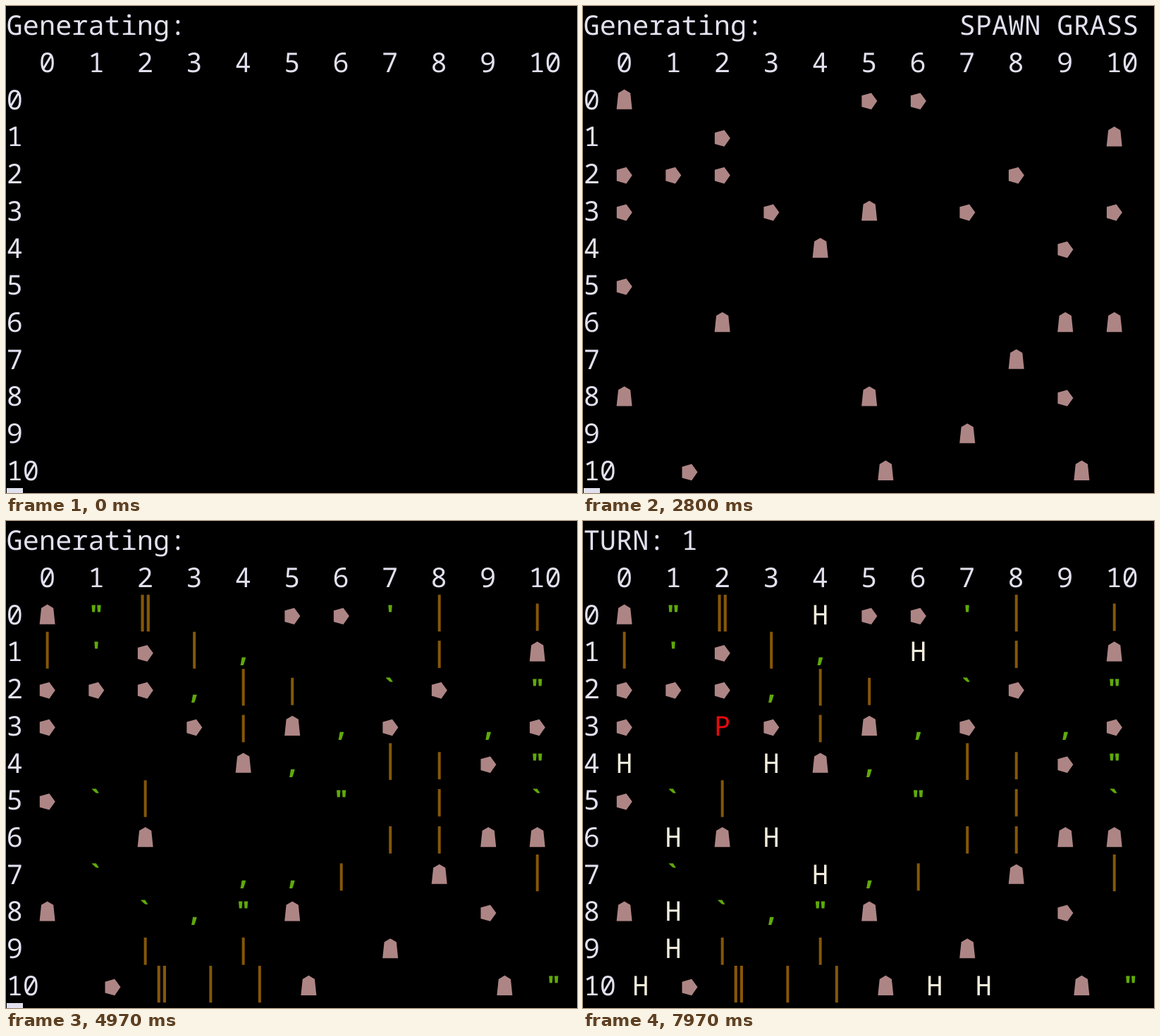
An HTML page that plays this animation: 810 by 692 pixels, repeating every 8 s.

```html
<!DOCTYPE html>
<html lang="en">
<head>
<meta charset="utf-8">
<title>Map generator</title>
<style>
  html, body { margin: 0; width: 100%; height: 100%; overflow: hidden; background: #000; }
  svg { display: block; width: 810px; height: 692px; }
  text {
    font: 38.6px "Noto Sans Mono", monospace;
    text-rendering: geometricPrecision;
    white-space: pre;
    fill: #e1e0ee;
  }
  .stone { fill: #ae8585; }
  .tree { fill: #855708; }
  text.grass { fill: #5faa0b; font-weight: 700; }
  text.human { fill: #f2eddc; }
  text.player { fill: #e60a0d; }
</style>
</head>
<body>
<svg id="stage" viewBox="0 0 810 692"></svg>
<script>
const LOOP = 8000, COL = 23.17, LINE = 52.73, LEFT = 0.7, TOP = -0.7, BASELINE = 41.15;
const stage = document.getElementById('stage');

// A, p: stones; T, D, t: trees; quotes and commas: grass
const MAP = [
  'A"D.Hpp\'T.t',
  'T\'pT,.H.t.A',
  'ppp,Tt.`p."',
  'p.PptA,p.,p',
  'H..HA,.Ttp"',
  'p`T...".t.`',
  '.HAH...ttAA',
  '.`..,,t.A.T',
  'AH`,"A...p.',
  '.Ht.t..A...',
  'HpDTTAHH.A"'
];

// label on, label off and first item, last item
const STAGES = {
  stone:  { label: 'SPAWN ROCKS',  times: [1400, 1750, 2400] },
  grass:  { label: 'SPAWN GRASS',  times: [2600, 3000, 3640] },
  tree:   { label: 'SPAWN TREES',  times: [3830, 4230, 4850] },
  human:  { label: 'SPAWN HUMAN',  times: [5080, 5480, 6060] },
  player: { label: 'SPAWN PLAYER', times: [6280, 6680, 6680] }
};
const TURN_START = 7000;
const BLINK = { period: 1170, off: 480, on: 1065 };
const timed = [];

function add(tag, attrs, text = '') {
  const el = document.createElementNS('http://www.w3.org/2000/svg', tag);
  for (const key in attrs) el.setAttribute(key, attrs[key]);
  el.textContent = text;
  return stage.appendChild(el);
}

const write = (text, col, line, cls = '') =>
  add('text', { x: LEFT + col * COL, y: BASELINE + line * LINE, class: cls }, text);

const during = (el, from, to = LOOP) => timed.push({ el, from, to });

function kindOf(char) {
  if ('Ap'.includes(char)) return 'stone';
  if ('TDt'.includes(char)) return 'tree';
  return { H: 'human', P: 'player' }[char] || 'grass';
}

function drawItem(char, col, line) {
  const cls = kindOf(char);
  if (cls !== 'stone' && cls !== 'tree') return write(char, col, line, cls);
  const x = LEFT + (col + 0.5) * COL, y = TOP + line * LINE;
  const place = `translate(${x} ${y})`;
  if (cls === 'stone') {
    const points = char === 'A'
      ? '0,13.8 8.6,18.9 11,42 -11,42 -8.6,18.9'
      : '-10.8,22.6 2.8,18.8 11.2,30.3 2.8,42.2 -10.8,38.4';
    return add('polygon', { points, class: cls, transform: place });
  }
  const d = {
    T: `M-2 0h4v${LINE - 0.5}h-4z`,
    D: `M-6.2 0h4.2v${LINE - 0.5}h-4.2zM2 0h4.2v${LINE - 0.5}h-4.2z`,
    t: 'M-2 12.6h4v38.8h-4z'
  }[char];
  return add('path', { d, class: cls, transform: place });
}

let seed = 7;
const random = () => (seed = seed * 16807 % 2147483647) / 2147483647;

during(write('Generating:', 0, 0), 0, TURN_START);
during(write('TURN: 1', 0, 0), TURN_START);
write('  ' + [...Array(11).keys()].join('  '), 0, 1);

const groups = { stone: [], grass: [], tree: [], human: [], player: [] };
MAP.forEach((row, r) => {
  write(String(r), 0, r + 2);
  [...row].forEach((char, c) => {
    if (char === '.') return;
    const el = drawItem(char, 2 + 3 * c + (r > 9 ? 1 : 0), r + 2);
    groups[kindOf(char)].push({ el, key: random(), r, c });
  });
});

// The last human takes the place of a tuft of grass.
const covered = groups.grass.find(g => g.r === 7 && g.c === 4);
groups.human.push({ el: drawItem('H', 14, 9), key: 2 });

for (const [kind, { label, times: [show, start, end] }] of Object.entries(STAGES)) {
  during(write(label, 34 - label.length, 0), show, start);
  const items = groups[kind].sort((a, b) => a.key - b.key);
  items.forEach((item, i) => {
    const at = start + (end - start) * i / Math.max(1, items.length - 1);
    during(item.el, at, item === covered ? STAGES.human.times[2] : LOOP);
  });
}

const cursor = add('rect', { x: 1, y: 685, width: 23, height: 7, fill: '#e1e0ee' });
const setVisible = (el, on) => { el.style.visibility = on ? 'visible' : 'hidden'; };

function render(now) {
  const t = now % LOOP;
  for (const { el, from, to } of timed) setVisible(el, t >= from && t < to);
  const phase = t % BLINK.period;
  setVisible(cursor, phase < BLINK.off || phase >= BLINK.on);
}

const began = performance.now();
function tick() {
  render(performance.now() - began);
  requestAnimationFrame(tick);
}
tick();
</script>
</body>
</html>
```
